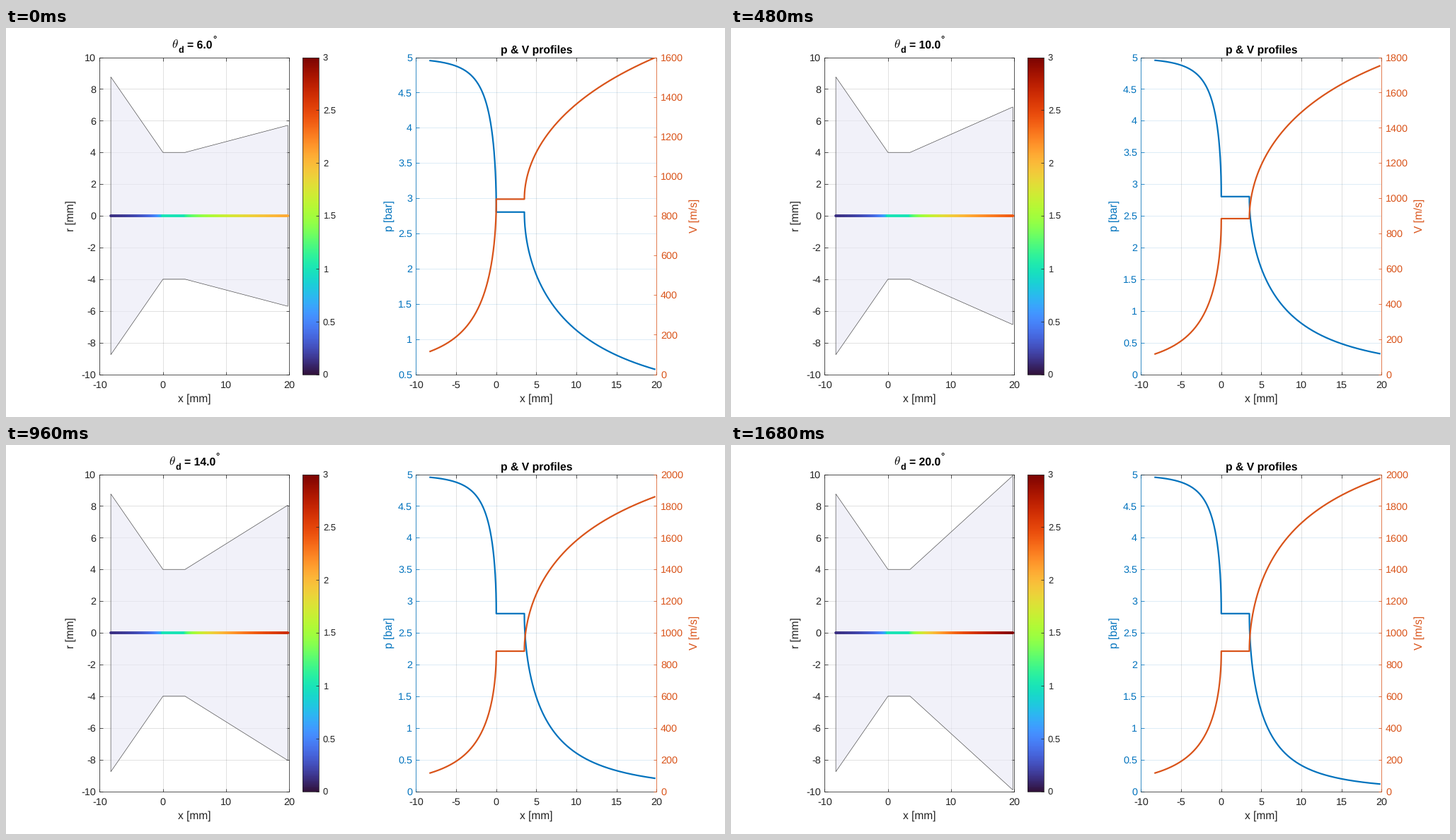
Recreate the animation shown at these times as a matplotlib script. Size 1016 px wide and 551 px high, loop 1800 ms.

```python
import numpy as np
import matplotlib.pyplot as plt
from matplotlib.animation import FuncAnimation
from matplotlib.colors import Normalize
from matplotlib.cm import ScalarMappable

W, H, DPI = 1016, 551, 64
FRAMES, INTERVAL = 15, 120
DARK, BLUE, ORANGE = "#212121", "#0072BD", "#D95319"
TICK, LABEL, TITLE = 14.4, 15.5, 15.8
TOP, BOTTOM = 41.5, 490.5

# Gas and nozzle data (mm, bar, m/s)
GAMMA, P0, A0 = 1.22, 5.0, 931.5
R_THROAT, X_IN, X_THROAT, X_OUT = 4.0, -8.25, 3.5, 19.75
R_IN = R_THROAT - X_IN * np.tan(np.radians(30))


def px(n):
    return n * 72 / DPI


plt.rcParams.update({
    "font.family": "Liberation Sans",
    "mathtext.fontset": "cm",
    "text.hinting": "none",
    "axes.linewidth": px(0.75),
})

fig = plt.figure(figsize=(W / DPI, H / DPI), dpi=DPI, facecolor="white")


def add_axes(x0, x1):
    # The nudge makes edges on pixel centres snap to that same pixel
    nudge = 0.02
    return fig.add_axes([(x0 - nudge) / W, 1 - (BOTTOM + nudge) / H,
                         (x1 - x0) / W, (BOTTOM - TOP) / H])


def put(x, y, text, size=LABEL, color=DARK, ha="center", **kw):
    return fig.text(x / W, 1 - y / H, text, fontsize=px(size), color=color,
                    ha=ha, va="baseline", rotation_mode="anchor", **kw)


def style_ticks(ax, axis, pad, color=DARK, size=TICK, length=4.5, **kw):
    ax.tick_params(axis=axis, direction="in", length=px(length), width=px(0.75),
                   pad=px(pad), color=color, labelcolor=color,
                   labelsize=px(size), **kw)
    target = ax.xaxis if axis == "x" else ax.yaxis
    target.set_major_formatter(lambda v, _: f"{v:g}")


def style_grid(ax, axis, color):
    ax.grid(axis=axis, color=color, alpha=0.15, linewidth=px(0.9))
    ax.set_axisbelow(True)


def area_ratio(m):
    k = (GAMMA + 1) / (2 * (GAMMA - 1))
    return (2 / (GAMMA + 1) * (1 + (GAMMA - 1) / 2 * m**2))**k / m


M_SUB = np.linspace(1, 0.05, 20000)
M_SUP = np.linspace(1, 4.5, 20000)

# Points bunch up at the throat, where the profiles are steepest
u = np.linspace(0, 1, 220)
x_conv = X_IN * u[::-1]**2
x_mid = np.linspace(0, X_THROAT, 60)
x_div = X_THROAT + (X_OUT - X_THROAT) * u**2
x_all = np.concatenate([x_conv, x_mid, x_div])


def flow(theta):
    """Mach number, pressure, velocity and exit radius of the nozzle."""
    slope = np.tan(np.radians(theta))
    r_conv = R_THROAT + (R_IN - R_THROAT) * x_conv / X_IN
    r_div = R_THROAT + (x_div - X_THROAT) * slope
    mach = np.concatenate([
        np.interp((r_conv / R_THROAT)**2, area_ratio(M_SUB), M_SUB),
        np.ones_like(x_mid),
        np.interp((r_div / R_THROAT)**2, area_ratio(M_SUP), M_SUP),
    ])
    t = 1 + (GAMMA - 1) / 2 * mach**2
    return mach, P0 * t**(-GAMMA / (GAMMA - 1)), A0 * mach / np.sqrt(t), r_div[-1]


def outline(r_out):
    top = [(X_IN, R_IN), (0, R_THROAT), (X_THROAT, R_THROAT), (X_OUT, r_out)]
    return top + [(x, -r) for x, r in reversed(top)]


# Nozzle view
nozzle = add_axes(132.5, 400.5)
nozzle.set(xlim=(-10, 20), ylim=(-10, 10),
           xticks=range(-10, 21, 10), yticks=range(-10, 11, 2))
style_ticks(nozzle, "x", 9.5, top=True)
style_ticks(nozzle, "y", 5.5, right=True)
style_grid(nozzle, "both", DARK)
for spine in nozzle.spines.values():
    spine.set_color(DARK)
body, = nozzle.fill(*zip(*outline(6)), facecolor=(0.91, 0.91, 0.965, 0.6),
                    edgecolor=(0.2, 0.2, 0.2, 0.9), linewidth=px(0.65), zorder=2)
mach_scale = Normalize(0, 3)
stream = nozzle.scatter(x_all, 0 * x_all, c=0 * x_all, s=px(3.9)**2, cmap="turbo",
                        norm=mach_scale, linewidths=0, clip_on=False, zorder=3)
put(266.5, 530, "x [mm]")
put(96, 266, "r [mm]", rotation=90)

# Mach colour bar
bar = fig.colorbar(ScalarMappable(mach_scale, "turbo"),
                   cax=add_axes(419.5, 442.5), ticks=np.arange(0, 3.1, 0.5))
bar.outline.set(edgecolor=DARK, linewidth=px(0.75))
style_ticks(bar.ax, "y", 5.5, size=13, length=4)

# Pressure and velocity profiles
ax_p = add_axes(579.5, 919.5)
ax_v = ax_p.twinx()
ax_p.set(xlim=(-10, 20), xticks=range(-10, 21, 5))
style_ticks(ax_p, "x", 9.5, top=True)
style_ticks(ax_p, "y", 5.5, BLUE)
style_ticks(ax_v, "y", 5.5, ORANGE)
style_grid(ax_p, "x", DARK)
style_grid(ax_p, "y", BLUE)
for side in ("top", "bottom"):
    ax_p.spines[side].set_color(DARK)
    ax_v.spines[side].set_visible(False)
ax_p.spines["left"].set_color(BLUE)
ax_p.spines["right"].set_visible(False)
ax_v.spines["left"].set_visible(False)
ax_v.spines["right"].set_color(ORANGE)
line_p, = ax_p.plot([], [], color=BLUE, linewidth=px(2.2))
line_v, = ax_v.plot([], [], color=ORANGE, linewidth=px(2.2))
put(749.3, 35.5, "p & V profiles", TITLE, "black", weight="bold")
put(749.5, 530, "x [mm]")
put(545.5, 266, "p [bar]", color=BLUE, rotation=90)
put(976.5, 266, "V [m/s]", color=ORANGE, rotation=90)

# Title pieces: text, baseline, size, weight
title = [put(0, y, s, size, "black", ha="left", weight=weight)
         for s, y, size, weight in [(r"$\theta$", 28.8, 17, "normal"),
                                    ("d", 35, 12.6, "bold"),
                                    ("", 28.8, TITLE, "bold"),
                                    ("°", 20.2, 13, "bold")]]


def set_title(theta):
    value = f"{theta:.1f}"
    extra = 8.8 * (len(value) - 3)
    left = 266.4 - (64.5 + extra) / 2
    title[2].set_text(f"= {value}")
    for piece, offset in zip(title, (0, 9.5, 21.8, 58 + extra)):
        piece.set_x((left + offset) / W)


def update(i):
    theta = 6 + i
    mach, p, v, r_out = flow(theta)
    set_title(theta)
    body.set_xy(outline(r_out))
    stream.set_array(mach)
    line_p.set_data(x_all, p)
    line_v.set_data(x_all, v)
    p_low = np.floor(p.min() / 0.5) * 0.5
    v_high = np.ceil(v.max() / 200) * 200
    ax_p.set_yticks(np.arange(p_low, 5.1, 0.5))
    ax_p.set_ylim(p_low, 5)
    ax_v.set_yticks(np.arange(0, v_high + 1, 200))
    ax_v.set_ylim(0, v_high)
    return body, stream, line_p, line_v, *title


anim = FuncAnimation(fig, update, frames=FRAMES, init_func=lambda: update(0),
                     interval=INTERVAL, repeat=True, repeat_delay=0, blit=False)
plt.show()
```
